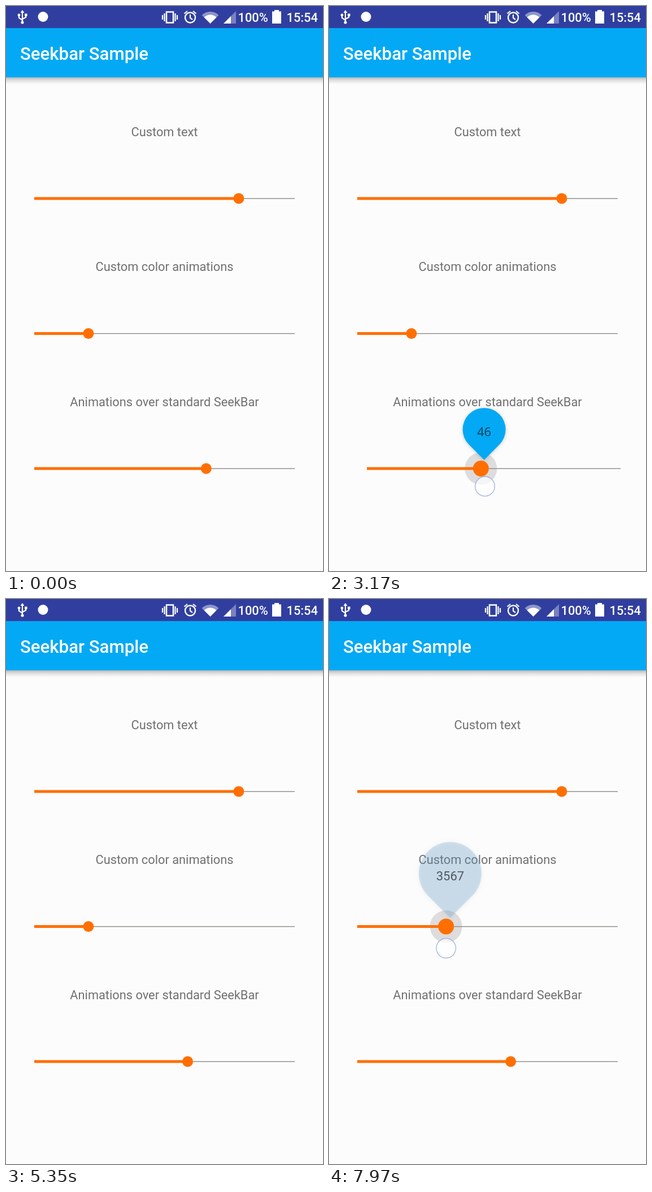
Animation, 561 px wide and 998 px high, one loop 7.99 s. Source, as an HTML page with a canvas:

```html
<!DOCTYPE html>
<html lang="en">
<head>
<meta charset="utf-8">
<title>Seekbar Sample</title>
<style>
html, body { margin: 0; width: 100%; height: 100%; overflow: hidden; background: #fcfcfc; }
canvas { display: block; width: 561px; height: 998px; }
</style>
</head>
<body>
<canvas id="stage" width="561" height="998"></canvas>
<script>
const ctx = document.getElementById('stage').getContext('2d');
const LOOP = 7990, LEFT = 50, RIGHT = 511, BUBBLE_LAG = 20, PRESS_MS = 200;
const ORANGE = '#ff6f00', BLUE = '#03a9f4', WHITE = '#fff';
const { PI, SQRT2 } = Math;

const clamp = v => Math.max(0, Math.min(1, v));
const mix = (a, b, p) => a + (b - a) * p;
const ease = p => (1 - Math.cos(PI * clamp(p))) / 2;

// Eases from one turning point [time, value] to the next.
const swing = (...turns) => t => turns.slice(1).reduce(
  (v, [time, next], i) => v + (next - turns[i][1]) * ease((t - turns[i][0]) / (time - turns[i][0])),
  turns[0][1]);

// Two soft pushes to the right.
function push(t) {
  const cycles = (t - 2320) / 650;
  return cycles > 0 && cycles < 2 ? 25 * Math.sin(PI * cycles) ** 2 : 0;
}

function fadingOrange(t) {
  const p = clamp((t - 6500) / 900);
  const rgb = [mix(255, 97, p), mix(111, 163, p), mix(0, 215, p)].map(Math.round);
  return `rgba(${rgb}, ${mix(1, .27, p)})`;
}

const bars = [
  { y: 340, label: 'Custom text', value: () => .785 },
  {
    y: 578.5, label: 'Custom color animations', down: 5750, up: Infinity,
    radius: 55.5, max: 10000, font: '22px Roboto, sans-serif', color: fadingOrange,
    value: swing([5850, .208], [6690, .419], [7320, .7249], [8368, .165]),
    fingerLag: 0,
    fingerY: t => 588 + (t - 5750) / 77
  },
  {
    y: 817, label: 'Animations over standard SeekBar', down: 1150, up: 5150,
    radius: 38, max: 100, font: '22px "Noto Sans", sans-serif', color: () => BLUE,
    value: swing([1750, .66], [2470, .4], [2950, .54], [3390, .36], [4400, .73], [5120, .589]),
    fingerLag: 25,
    fingerY: swing([1950, 848], [2200, 858], [4000, 841], [5100, 852]),
    ends: t => [LEFT + push(t), RIGHT + push(t - 104)]
  }
];

function rect(x, y, w, h, color) {
  ctx.fillStyle = color;
  ctx.fillRect(x, y, w, h);
}

function disc(x, y, r, color) {
  ctx.fillStyle = color;
  ctx.beginPath();
  ctx.arc(x, y, r, 0, 2 * PI);
  ctx.fill();
}

function ring(x, y, r, width, color) {
  ctx.strokeStyle = color;
  ctx.lineWidth = width;
  ctx.beginPath();
  ctx.arc(x, y, r, 0, 2 * PI);
  ctx.stroke();
}

function path(...points) {
  ctx.beginPath();
  points.forEach(([x, y]) => ctx.lineTo(x, y));
}

function line(...points) {
  ctx.strokeStyle = WHITE;
  ctx.lineWidth = 2.2;
  path(...points);
  ctx.stroke();
}

// Right-angled triangle with its square corner at the bottom right.
function wedge(x, y, size, color) {
  ctx.fillStyle = color;
  path([x - size, y], [x, y], [x, y - size]);
  ctx.fill();
}

function fan(r, color) {
  ctx.fillStyle = color;
  ctx.beginPath();
  ctx.moveTo(361.5, 31);
  ctx.arc(361.5, 31, r, -.75 * PI, -.25 * PI);
  ctx.fill();
}

function text(str, x, y, font, color, align = 'left') {
  ctx.font = font;
  ctx.fillStyle = color;
  ctx.textAlign = align;
  ctx.fillText(str, x, y);
}

function usbIcon(x) {
  line([x, 10], [x, 29]);
  line([x - 6, 17], [x - 6, 21], [x, 25]);
  line([x + 6, 16], [x + 6, 20], [x, 23]);
  ctx.fillStyle = WHITE;
  path([x, 7], [x + 3.5, 12], [x - 3.5, 12]);
  ctx.fill();
  disc(x, 29, 2.6, WHITE);
  disc(x - 6, 16, 2.4, WHITE);
  rect(x + 4, 13.5, 4.5, 4.5, WHITE);
}

function vibrateIcon(x) {
  ctx.strokeStyle = WHITE;
  ctx.lineWidth = 2.5;
  ctx.strokeRect(x - 6, 10.5, 12, 19);
  for (const side of [-1, 1]) {
    line([x + side * 9.5, 13], [x + side * 9.5, 27]);
    line([x + side * 13, 16], [x + side * 13, 24]);
  }
}

function alarmIcon(x) {
  ring(x, 20.5, 9, 2.4, WHITE);
  line([x, 15], [x, 21], [x + 4, 24]);
  for (const side of [-1, 1]) line([x + side * 10.5, 13.5], [x + side * 5, 9]);
}

function statusBar() {
  rect(0, 0, 561, 39, '#303f9f');
  usbIcon(29);
  disc(65.5, 19, 9, WHITE);
  vibrateIcon(290);
  alarmIcon(326);
  fan(21, 'rgba(255,255,255,.45)');
  fan(15.5, WHITE);
  wedge(407, 31, 22, 'rgba(255,255,255,.35)');
  wedge(398, 31, 13, WHITE);
  rect(471, 9.5, 16, 21.5, WHITE);
  rect(475, 7, 8, 3, WHITE);
  const font = '500 21.8px Roboto, sans-serif';
  text('100%', 410.5, 28, font, WHITE);
  text('15:54', 496.5, 28, font, WHITE);
}

function appBar() {
  const shadow = ctx.createLinearGradient(0, 126, 0, 138);
  shadow.addColorStop(0, 'rgba(0,0,0,.28)');
  shadow.addColorStop(.4, 'rgba(0,0,0,.12)');
  shadow.addColorStop(1, 'rgba(0,0,0,0)');
  rect(0, 126, 561, 12, shadow);
  rect(0, 39, 561, 87, BLUE);
  text('Seekbar Sample', 25, 95, '500 31.2px Roboto, sans-serif', WHITE);
}

function drawBubble(bar, x, t, scale) {
  const r = bar.radius, drop = r * SQRT2;
  ctx.save();
  ctx.translate(x, bar.y - 15.3);
  ctx.scale(scale, scale);
  ctx.translate(0, -drop);
  ctx.shadowColor = 'rgba(0,0,0,.2)';
  ctx.shadowBlur = 6;
  ctx.shadowOffsetY = 1;
  ctx.fillStyle = bar.color(t);
  ctx.beginPath();
  ctx.arc(0, 0, r, .75 * PI, 2.25 * PI);
  ctx.lineTo(0, drop);
  ctx.fill();
  ctx.shadowColor = 'transparent';
  const number = Math.round(bar.value(t - BUBBLE_LAG) * bar.max);
  text(number, 0, 12, bar.font, 'rgba(0,0,0,.6)', 'center');
  ctx.restore();
}

function drawFinger(x, y) {
  disc(x, y, 17, 'rgba(255,255,255,.72)');
  ring(x, y, 17.3, 1.6, 'rgba(140,155,220,.65)');
}

function drawBar(bar, t) {
  const { y, down, up } = bar;
  const [left, right] = bar.ends ? bar.ends(t) : [LEFT, RIGHT];
  const xAt = time => mix(left, right, bar.value(time));
  const x = xAt(t);
  const press = down ? ease((t - down) / PRESS_MS) * ease((up + PRESS_MS - t) / PRESS_MS) : 0;

  disc(x, y, 28.5 * press, 'rgba(0,0,0,.12)');
  rect(left, y - .6, right - left, 1.4, '#8b8b87');
  rect(left, y - 2.5, x - left, 5, ORANGE);
  disc(x, y, mix(9.5, 14, press), ORANGE);
  if (!press) return;

  drawBubble(bar, xAt(t - BUBBLE_LAG), t, press);
  if (t < up) drawFinger(xAt(t - bar.fingerLag), bar.fingerY(t));
}

function draw(t) {
  rect(0, 0, 561, 998, '#fcfcfc');
  statusBar();
  appBar();
  for (const { label, y } of bars) {
    text(label, 280.5, Math.round(y - 110.4), '21.8px Roboto, sans-serif', '#707070', 'center');
  }
  for (const bar of bars) drawBar(bar, t);
}

const start = performance.now();
function tick() {
  draw((performance.now() - start) % LOOP);
  requestAnimationFrame(tick);
}
tick();
</script>
</body>
</html>
```
